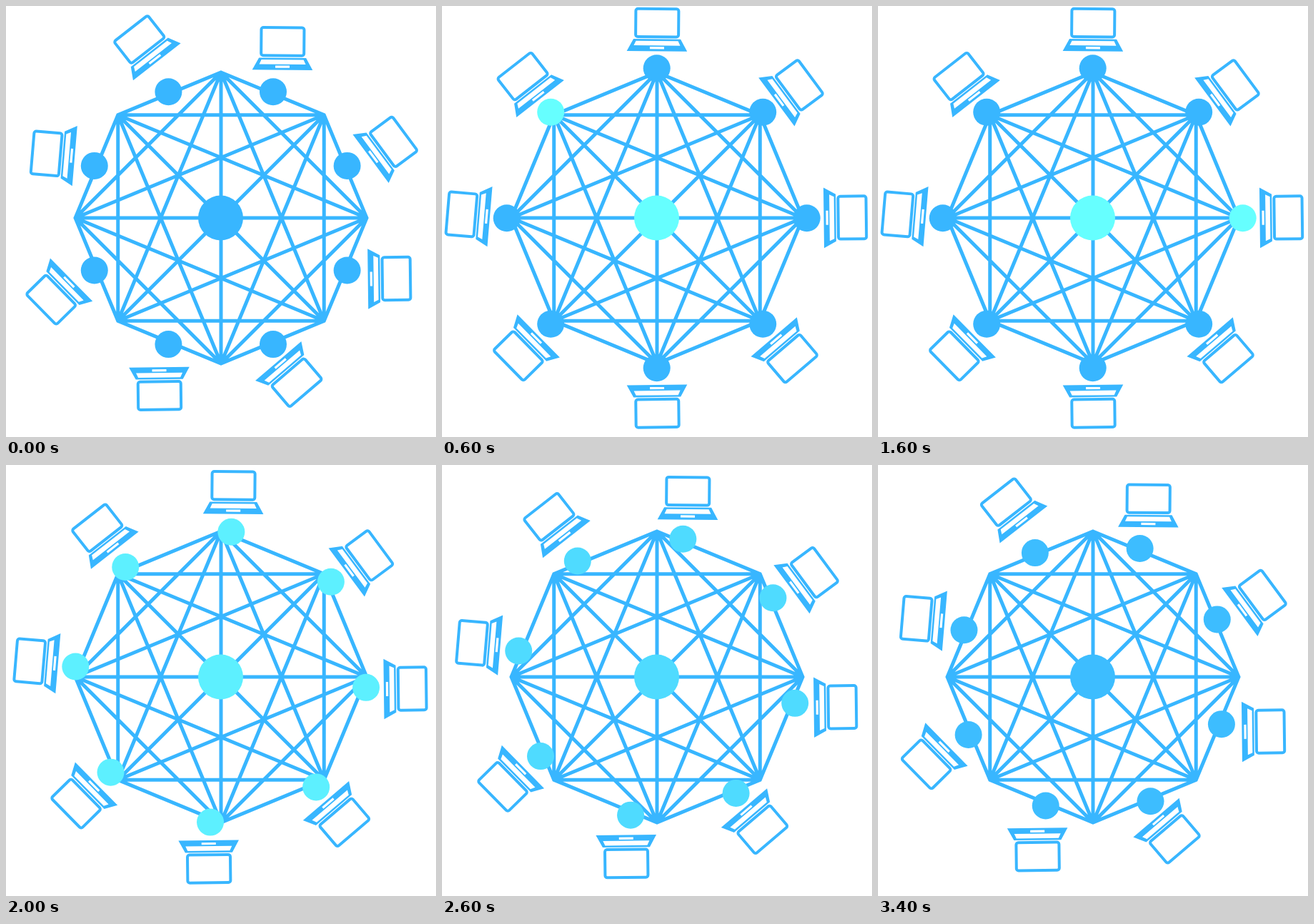
Animation of 602 by 604 pixels, one loop 3600 ms. Source, as an HTML page with a canvas:

```html
<!DOCTYPE html>
<html lang="en">
<head>
<meta charset="utf-8">
<title>Peer network</title>
<style>
  html, body { margin: 0; width: 100%; height: 100%; overflow: hidden; background: #fff; }
  canvas { display: block; }
</style>
</head>
<body>
<canvas id="stage" width="602" height="604"></canvas>
<script>
const ctx = document.getElementById('stage').getContext('2d');
const STEP = 200, STEPS = 18, COUNT = 8;
const CX = 300.7, CY = 297.2;
const BLUE = [56, 182, 255], CYAN = [102, 255, 255];

// Hand-placed look of the laptops, clockwise from the top, in degrees
const lean = [0.5, 8.5, -0.7, 4.5, -0.7, 0.5, 4.8, 7];
const heading = [107, 107, 108, 113, 106, 106, 109, 100];

const rad = deg => deg * Math.PI / 180;
const polar = (deg, r, x = CX, y = CY) => [x + r * Math.sin(rad(deg)), y - r * Math.cos(rad(deg))];
const mix = (a, b, p) => a.map((v, i) => v + (b[i] - v) * p);
const rgb = c => `rgb(${c.map(Math.round)})`;
const angles = Array.from({ length: COUNT }, (_, i) => i * 360 / COUNT);

function polygon(path, points) {
  points.forEach(([x, y], i) => i ? path.lineTo(x, y) : path.moveTo(x, y));
  path.closePath();
  return path;
}

const corners = angles.map(a => polar(a, 204, 301, 297));
const mesh = polygon(new Path2D(), corners);
corners.forEach((a, i) => corners.slice(i + 2).forEach(b => {
  mesh.moveTo(...a);
  mesh.lineTo(...b);
}));

const trapezoid = (path, top, topHalf, bottom, bottomHalf) => polygon(path,
  [[-topHalf, top], [topHalf, top], [bottomHalf, bottom], [-bottomHalf, bottom]]);
const screen = new Path2D();
screen.roundRect(-30, -59.4, 60, 39.2, 3);
const base = trapezoid(new Path2D(), -17, 33, 0, 42.3);
trapezoid(base, -14.5, 29.5, -8, 32.5);
trapezoid(base, -6.2, 10, -3, 10);

function drawLaptop(i, move) {
  const [x, y] = polar(angles[i] + heading[i], 90 * move, ...polar(angles[i], 210));
  ctx.save();
  ctx.translate(x, y);
  ctx.rotate(rad(angles[i] + lean[i]));
  ctx.translate(0, -23.8);
  ctx.lineWidth = 4;
  ctx.stroke(screen);
  ctx.fill(base, 'evenodd');
  ctx.restore();
}

function disc(x, y, r, color) {
  ctx.fillStyle = rgb(color);
  ctx.beginPath();
  ctx.arc(x, y, r, 0, 2 * Math.PI);
  ctx.fill();
}

function draw(step) {
  const roaming = step === 0 || step > COUNT;
  const move = roaming ? ((step || STEPS) - COUNT) / 10 : 0;
  const active = (10 - step) % COUNT;   // the light runs anticlockwise
  const glow = mix(CYAN, BLUE, move);

  ctx.clearRect(0, 0, 602, 604);
  ctx.strokeStyle = ctx.fillStyle = rgb(BLUE);
  ctx.lineWidth = 5;
  ctx.stroke(mesh);
  angles.forEach((_, i) => drawLaptop(i, move));
  disc(300.5, 297, 31.5, glow);
  angles.forEach((a, i) => {
    const [x, y] = mix(polar(a, 210), polar(a + 22.5, 191.5), move);
    disc(x, y, 19, roaming || i === active ? glow : BLUE);
  });
}

const start = performance.now();
function tick() {
  draw(Math.floor((performance.now() - start) / STEP) % STEPS);
  requestAnimationFrame(tick);
}
tick();
</script>
</body>
</html>
```
